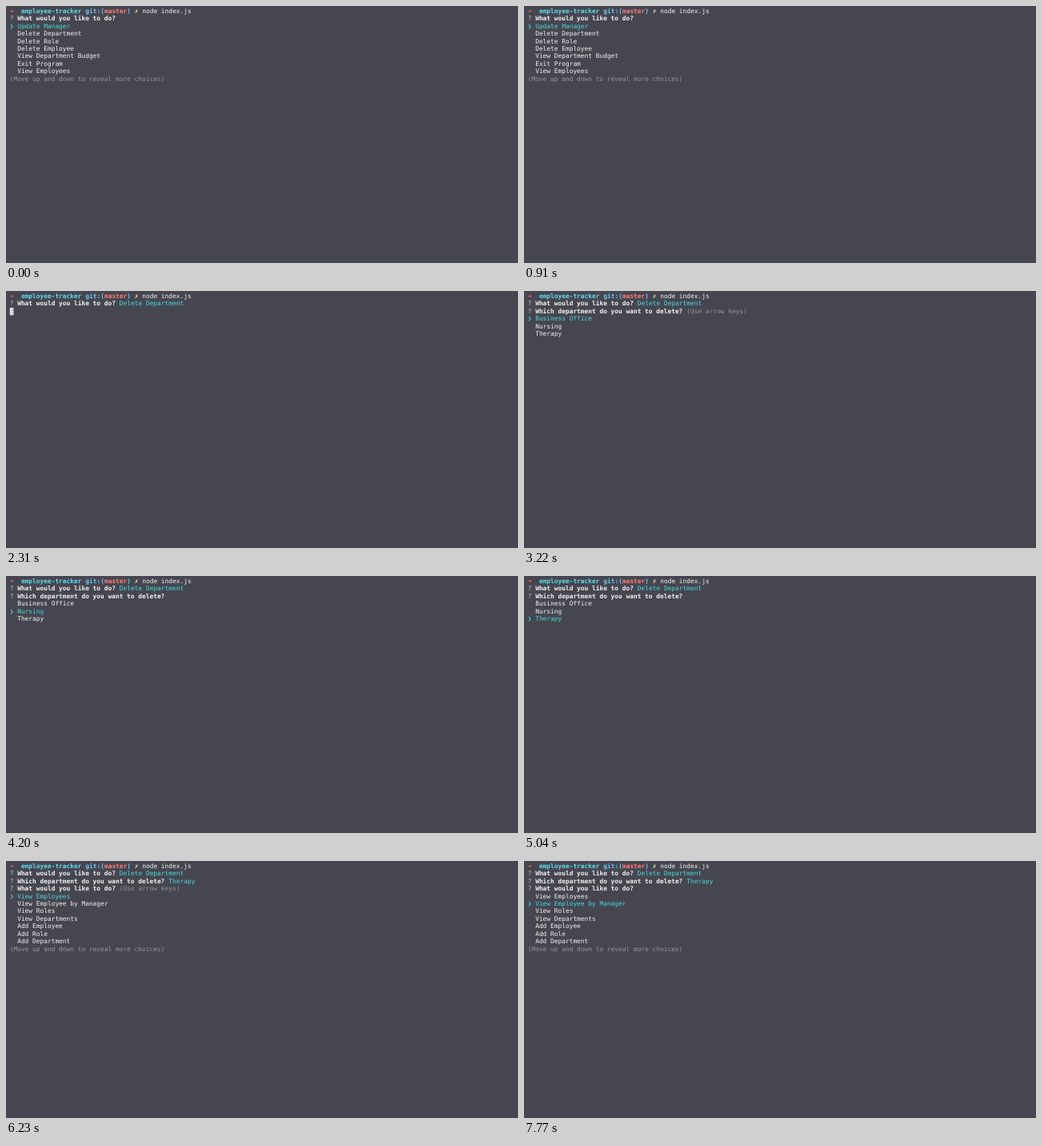
An HTML page for the animation above (8000 ms loop, 640 by 322 pixels).

```html
<!DOCTYPE html>
<html lang="en">
<head>
<meta charset="utf-8">
<title>Terminal menu</title>
<style>
  html, body { margin: 0; width: 100%; height: 100%; overflow: hidden; background: #464650; }
  svg { display: block; width: 100vw; height: 100vh; }
  text {
    font: 7.857px "DejaVu Sans Mono", "Liberation Mono", monospace;
    text-rendering: geometricPrecision;
    white-space: pre;
    fill: #f2f2f2;
  }
  .bold { font-weight: 700; }
  .red { fill: #ff6764; font-weight: 700; }
  .master { fill: #ff7b76; font-weight: 700; }
  .dir { fill: #5cdcf0; font-weight: 700; }
  .git { fill: #6cc4f2; font-weight: 700; }
  .dirty { fill: #eeeac0; }
  .mark { fill: #bdd2ba; }
  .cyan { fill: #45dada; }
  .hint { fill: #97979c; }
  .cursor { fill: #d9d9da; }
</style>
</head>
<body>
<svg viewBox="0 0 640 322" preserveAspectRatio="none"></svg>
<script>
const LOOP = 8000;
const LEFT = 4.7, COLUMN = 4.73, BASELINE = 8.7, LINE = 9.45;
const svg = document.querySelector("svg");

function add(parent, tag, attributes = {}, content = "") {
  const node = document.createElementNS("http://www.w3.org/2000/svg", tag);
  for (const [key, value] of Object.entries(attributes)) node.setAttribute(key, value);
  node.textContent = content;
  parent.append(node);
  return node;
}

// Each part is [text, class]; a part starts in the column after the previous one.
function writeLine(group, row, parts) {
  let column = 0;
  for (const [content, style] of parts) {
    const x = LEFT + column * COLUMN;
    const y = BASELINE + row * LINE;
    if (content.trim()) add(group, "text", { x, y, class: style || "plain" }, content);
    column += content.length;
  }
}

const ask = (question, tail = "", style = "cyan") =>
  [["?", "mark"], [" "], [question, "bold"], [" "], [tail, style]];

const list = (choices, selected) => choices.map((choice, i) =>
  i === selected ? [["❯", "cyan"], [" "], [choice, "cyan"]] : [["  "], [choice]]);

const ACTION = "What would you like to do?";
const DEPARTMENT = "Which department do you want to delete?";
const ARROWS = "(Use arrow keys)";
const more = [["(Move up and down to reveal more choices)", "hint"]];

const actions = ["Update Manager", "Delete Department", "Delete Role", "Delete Employee",
  "View Department Budget", "Exit Program", "View Employees"];
const departments = ["Business Office", "Nursing", "Therapy"];
const views = ["View Employees", "View Employee by Manager", "View Roles", "View Departments",
  "Add Employee", "Add Role", "Add Department"];

const command = [["➜", "red"], ["  "], ["employee-tracker", "dir"], [" "], ["git:(", "git"],
  ["master", "master"], [")", "git"], [" "], ["✗", "dirty"], [" "], ["node index.js"]];
const chosen = ask(ACTION, "Delete Department");
const deleted = ask(DEPARTMENT, "Therapy");

const actionMenu = selected => [ask(ACTION), ...list(actions, selected), more];
const departmentMenu = (selected, tail) =>
  [chosen, ask(DEPARTMENT, tail, "hint"), ...list(departments, selected)];
const viewMenu = (selected, tail) =>
  [chosen, deleted, ask(ACTION, tail, "hint"), ...list(views, selected), more];

const screens = [
  { at: 0, lines: actionMenu(0) },
  { at: 1540, lines: actionMenu(1) },
  { at: 2240, lines: [chosen], cursorRow: 2 },
  { at: 2380, lines: departmentMenu(0, ARROWS) },
  { at: 3360, lines: departmentMenu(1) },
  { at: 4830, lines: departmentMenu(2) },
  { at: 6230, lines: viewMenu(0, ARROWS) },
  { at: 7350, lines: viewMenu(1) },
];

writeLine(svg, 0, command);
for (const screen of screens) {
  screen.group = add(svg, "g");
  screen.lines.forEach((parts, i) => writeLine(screen.group, i + 1, parts));
  if (screen.cursorRow) {
    add(screen.group, "rect", { x: LEFT, y: 2 + screen.cursorRow * LINE,
      width: COLUMN, height: LINE, class: "cursor" });
  }
}

function draw() {
  const time = performance.now() % LOOP;
  const current = screens.findLast(screen => screen.at <= time);
  for (const screen of screens) {
    screen.group.style.display = screen === current ? "inline" : "none";
  }
  requestAnimationFrame(draw);
}
draw();
</script>
</body>
</html>
```
